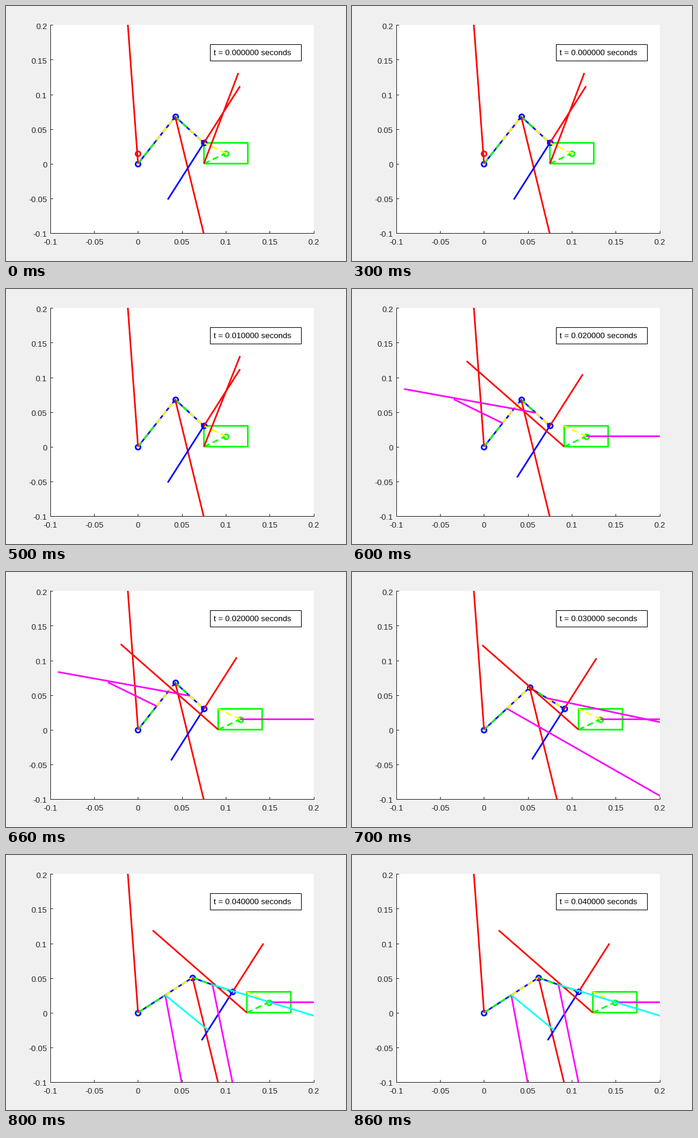
Animation, 560 px wide and 420 px high, one loop 900 ms. Source, as a matplotlib script:

```python
import matplotlib.pyplot as plt
import numpy as np
from matplotlib.animation import ArtistAnimation
from matplotlib.patches import Rectangle

W, H, DPI = 560, 420, 100
PX = 72 / DPI                       # one pixel in points
LEFT, RIGHT, TOP, BOTTOM = 72.8, 506.8, 31.4, 373.8

# Lengths in millimetres
LINK1, LINK2 = 80, 50
BOX_W, BOX_H = 50, 30
STEP = 16.3
FAR = 400

# Contact forces for each time step
NORMAL = [81.8, 81.8, 74.4, 73, 69.8]
GROUND_X = [39.2, 41.2, -111, -109.7, -107.2]
BOX_WEIGHT = 49

# Vectors at the centres of the two links, by time step
ACCEL = {2: ((-55.5, 34.4), (-149.8, 34.3)),
         3: ((209, -151), (154, -41.4)),
         4: ((22.3, -150.6), (27.2, -168.6))}
VELOCITY = {4: ((49, -50.7), (138.5, -53.6))}

plt.rcParams["font.family"] = "Liberation Sans"
plt.rcParams["font.size"] = 13.33 * PX
plt.rcParams["toolbar"] = "None"

fig = plt.figure(figsize=(W / DPI, H / DPI), dpi=DPI, facecolor="#f0f0f0")
ax = fig.add_axes([LEFT / W, 1 - BOTTOM / H, (RIGHT - LEFT) / W, (BOTTOM - TOP) / H])


def label(x, y, text, **kw):
    return fig.text(x / W, 1 - y / H, text, va="baseline", **kw)


def setup_axes():
    dark = "#262626"
    ax.set(xlim=(-100, 200), ylim=(-100, 200), facecolor="white")
    ticks = np.arange(-100, 201, 50)
    ax.set_xticks(ticks, [""] * len(ticks))
    ax.set_yticks(ticks, [""] * len(ticks))
    ax.tick_params(direction="in", length=4.3 * PX, width=PX, color=dark)
    ax.spines[["top", "right"]].set_visible(False)
    ax.spines[["left", "bottom"]].set(linewidth=PX, color=dark)
    ax.set_axisbelow(True)
    for spine in ax.spines.values():
        spine.set_zorder(1)
    for tick in ticks:
        part = (tick + 100) / 300
        text = f"{tick / 1000:g}"
        label(LEFT + part * (RIGHT - LEFT), 393, text, ha="center", color=dark)
        label(67.5, BOTTOM - part * (BOTTOM - TOP) + 6.3, text, ha="right", color=dark)
    fig.add_artist(Rectangle((336 / W, 1 - 90 / H), 150 / W, 27 / H,
                             facecolor="white", edgecolor="black",
                             linewidth=PX, snap=True))


def line(points, color, dashed=False, marker=None):
    x, y = zip(*points)
    style = (0, (3.75, 2.25)) if dashed else "-"
    return ax.plot(x, y, color=color, linestyle=style, linewidth=2.67 * PX,
                   marker=marker, markersize=8 * PX, markerfacecolor="none",
                   markeredgewidth=2.67 * PX, solid_capstyle="butt",
                   dash_capstyle="butt", snap=False, zorder=3)[0]


def arrow(start, vector, color):
    start = np.array(start)
    return line([start, start + vector], color)


def spokes(low, centre, high):
    """Dashed lines from a body's two contact points to its centre."""
    return [line([low, centre], "lime", dashed=True),
            line([centre, high], "yellow", dashed=True)]


def elbow_at(tip):
    dist = np.hypot(*tip)
    bend = np.arccos((LINK1**2 + dist**2 - LINK2**2) / (2 * LINK1 * dist))
    angle = np.arctan2(tip[1], tip[0]) + bend
    return LINK1 * np.array([np.cos(angle), np.sin(angle)])


def box_left(k):
    return 75 + STEP * max(0, k - 1)


def pose(k):
    base = np.zeros(2)
    tip = np.array([box_left(k - 1), BOX_H])
    elbow = elbow_at(tip)
    mid1, mid2 = elbow / 2, (elbow + tip) / 2
    x = box_left(k)
    corner, top = (x, 0), (x, BOX_H)
    centre = (x + BOX_W / 2, BOX_H / 2)
    push = NORMAL[k] * np.array([0.503, 1])

    parts = [line([corner, (x + BOX_W, 0), (x + BOX_W, BOX_H), top, corner], "lime"),
             line([base, elbow, tip], "blue", marker="o"),
             line([centre], "lime", marker="o")]
    if k == 0:
        parts.append(line([(0, BOX_H / 2)], "red", marker="o"))
    parts += spokes(base, mid1, elbow) + spokes(elbow, mid2, tip)
    parts += spokes(corner, centre, top)
    parts += [arrow(base, (-13.9, 240), "red"),
              arrow(elbow, (40, -208), "red"),
              arrow(tip, push, "red"),
              arrow(tip, -push, "blue"),
              arrow(corner, (GROUND_X[k], NORMAL[k] + BOX_WEIGHT), "red")]
    if k >= 2:
        parts.append(arrow(centre, (FAR, 0), "magenta"))
    for table, color in ((ACCEL, "magenta"), (VELOCITY, "cyan")):
        for start, vector in zip((mid1, mid2), table.get(k, ())):
            parts.append(arrow(start, vector, color))
    parts.append(label(342, 81.4, f"t = {k / 100:.6f} seconds", color="black"))
    return parts


setup_axes()
poses = [pose(k) for k in range(5)]
# The first pose holds for half a second
anim = ArtistAnimation(fig, [poses[0]] * 5 + poses[1:], interval=100,
                       repeat=True, repeat_delay=0, blit=False)
plt.show()
```
